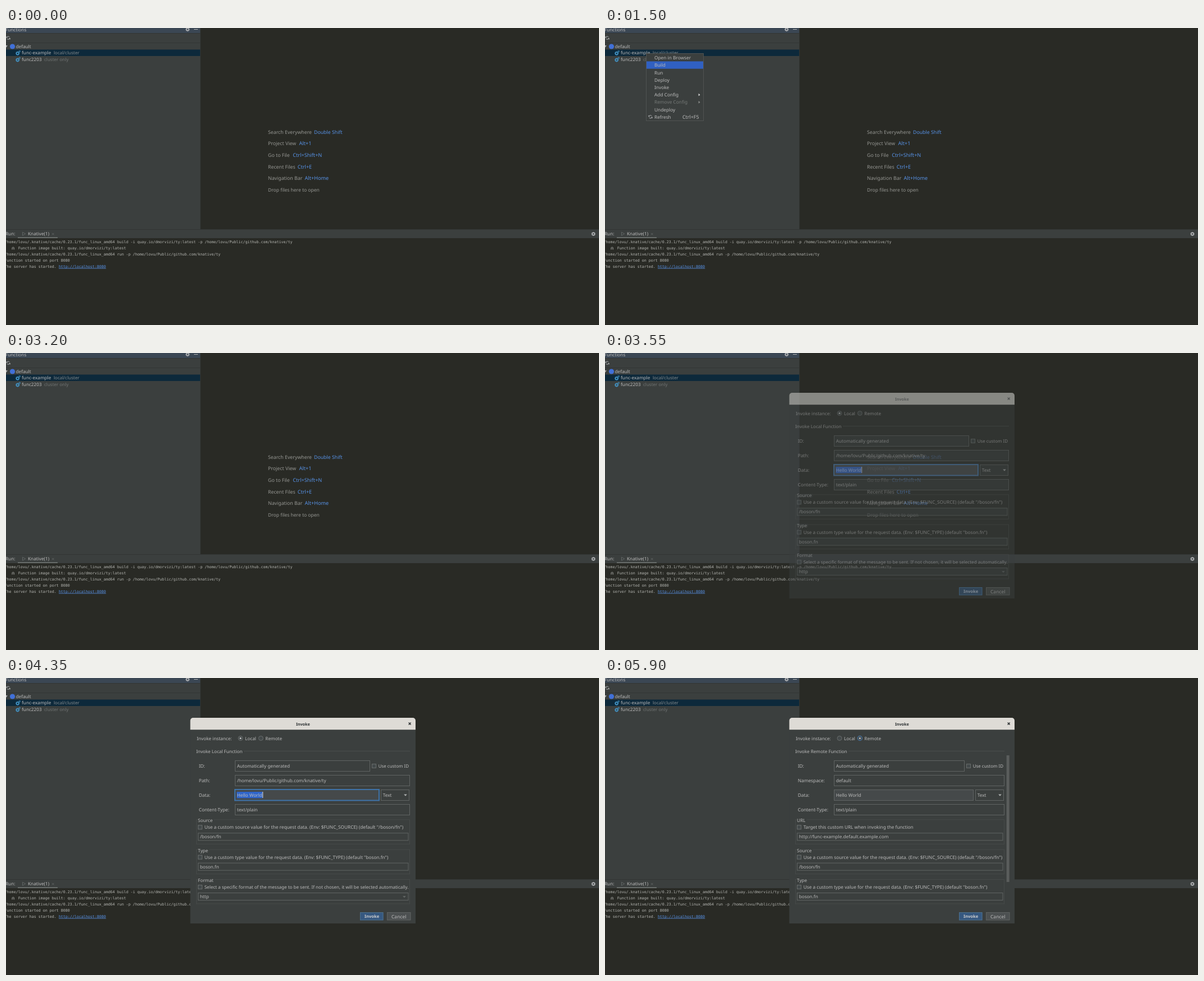
An HTML page with a canvas that plays this animation: 1057x530 px, repeating every 8 s.

```html
<!DOCTYPE html>
<html lang="en">
<head>
<meta charset="utf-8">
<title>Invoke function</title>
<style>
  html, body { margin: 0; width: 100%; height: 100%; overflow: hidden; background: #292a25; }
  canvas { display: block; }
</style>
</head>
<body>
<canvas id="stage" width="1057" height="530"></canvas>
<script>
const ctx = document.getElementById('stage').getContext('2d');
const LOOP = 8000;
const PANEL = '#3b3f3e', EDITOR = '#292a25', TEXT = '#bbbbbb', LINE = '#323534';
const SANS = '"Noto Sans", sans-serif', MONO = '"DejaVu Sans Mono", monospace';
const HOME = '/home/lovu';
const PROJECT = HOME + '/Public/github.com/knative/ty';
const CLI = HOME + '/.knative/cache/0.23.1/func_linux_amd64';

function rect(x, y, w, h, fill, border, weight = 1) {
  ctx.fillStyle = fill;
  ctx.fillRect(x, y, w, h);
  if (border) {
    ctx.strokeStyle = border;
    ctx.lineWidth = weight;
    ctx.strokeRect(x + weight / 2, y + weight / 2, w - weight, h - weight);
  }
}

// y is the middle of the capitals
function text(str, x, y, color = TEXT, size = 8.2, weight = 400, family = SANS) {
  ctx.font = `${weight} ${size}px ${family}`;
  ctx.fillStyle = color;
  ctx.fillText(str, x, y + size * 0.36);
}

function path(points, color, weight, close) {
  ctx.beginPath();
  points.forEach(([x, y]) => ctx.lineTo(x, y));
  if (close) ctx.closePath();
  if (weight) {
    ctx.strokeStyle = color;
    ctx.lineWidth = weight;
    ctx.stroke();
  } else {
    ctx.fillStyle = color;
    ctx.fill();
  }
}

function circle(x, y, r, fill, border, weight = 1) {
  ctx.beginPath();
  ctx.arc(x, y, r, 0, 7);
  if (fill) { ctx.fillStyle = fill; ctx.fill(); }
  if (border) { ctx.strokeStyle = border; ctx.lineWidth = weight; ctx.stroke(); }
}

function cross(x, y, r, color, weight) {
  path([[x - r, y - r], [x + r, y + r]], color, weight);
  path([[x - r, y + r], [x + r, y - r]], color, weight);
}

function gear(x, y, r, color) {
  for (let i = 0; i < 8; i++) {
    const a = i * Math.PI / 4, c = Math.cos(a), s = Math.sin(a);
    path([[x + c * r * 0.6, y + s * r * 0.6], [x + c * r, y + s * r]], color, r * 0.42);
  }
  circle(x, y, r * 0.58, null, color, r * 0.4);
}

function refreshIcon(x, y) {
  ctx.strokeStyle = '#afb1b3';
  ctx.lineWidth = 1;
  for (const start of [0.25, 3.39]) {
    ctx.beginPath();
    ctx.arc(x, y, 2.7, start, start + 2.4);
    ctx.stroke();
  }
  path([[x - 3.6, y - 3], [x - 3.6, y - 0.2], [x - 0.9, y - 0.2]], '#afb1b3');
  path([[x + 3.6, y + 3], [x + 3.6, y + 0.2], [x + 0.9, y + 0.2]], '#afb1b3');
}

function drawTree() {
  rect(0, 0, 346, 360, PANEL);
  rect(0, 0, 346, 9, '#3b4754');
  rect(0, 9, 346, 1, LINE);
  rect(0, 26, 346, 1, LINE);
  rect(346, 0, 1, 360, LINE);
  text('Functions', -1, 2.8);
  gear(323.7, 2.5, 3.6, '#afb1b3');
  rect(335, 2, 7, 1, '#afb1b3');
  refreshIcon(4, 17.7);

  rect(0, 38.5, 346, 11.5, '#0d293b');
  path([[-2, 31], [2.8, 31], [0.4, 35]], '#adadad');
  circle(11.5, 33, 4.6, '#4170d8');
  text('default', 17.5, 33.2);
  [['func-example', 44.5, 'local/cluster', 85, '#858b8e'],
   ['func2203', 56.2, 'cluster only', 68, '#707473']].forEach(([name, y, note, x, color]) => {
    gear(20.7, y + 0.8, 3.6, '#4293c4');
    gear(24.3, y - 2.7, 1.8, '#4293c4');
    text(name, 28, y);
    text(note, x, y, color, 8.03);
  });
}

function drawTips() {
  [['Search Everywhere', 'Double Shift', 549], ['Project View', 'Alt+1', 522.5],
   ['Go to File', 'Ctrl+Shift+N', 511.3], ['Recent Files', 'Ctrl+E', 519.7],
   ['Navigation Bar', 'Alt+Home', 532.5], ['Drop files here to open', '', 0]
  ].forEach(([label, keys, x], i) => {
    const y = 185.5 + i * 20.65;
    text(label, 467, y, '#969793', i === 5 ? 8.5 : 8.78);
    text(keys, x, y, '#5792e6', i ? 9.15 : 8.75);
  });
}

function drawConsole() {
  rect(0, 359, 1057, 1, LINE);
  rect(0, 360, 1057, 15, PANEL);
  text('Run:', -1, 367.5);
  path([[29.5, 364.3], [34.8, 367.3], [29.5, 370.3]], '#606564', 1, true);
  text('Knative(1)', 39, 367.5);
  cross(83.8, 367.6, 1.7, '#646867', 0.9);
  rect(21, 373.4, 71, 1.6, '#737876');
  gear(1047, 367.5, 3.6, '#afb1b3');

  const line = (str, row, x = -2.4, color = '#b6b7b3') =>
    text(str, x, 381.9 + row * 10.9, color, 6.66, 400, MONO);
  line(CLI + ' build -i quay.io/dmorvizi/ty:latest -p ' + PROJECT, 0);
  ctx.beginPath();
  ctx.arc(12.7, 393, 1.9, Math.PI, 0);
  ctx.lineTo(14.6, 395.5);
  ctx.moveTo(10.8, 393);
  ctx.lineTo(10.8, 395.5);
  ctx.moveTo(12.7, 392.5);
  ctx.lineTo(12.7, 395);
  ctx.strokeStyle = '#969793';
  ctx.lineWidth = 0.9;
  ctx.stroke();
  line('Function image built: quay.io/dmorvizi/ty:latest', 1, 21.7);
  line(CLI + ' run -p ' + PROJECT, 2);
  line('Function started on port 8080', 3);
  line('The server has started. ', 4);
  line('http://localhost:8080', 4, 93.9, '#5792e6');
  rect(94, 428.6, 84.3, 0.8, '#5792e6');
}

function drawTooltip() {
  rect(73, 56, 369, 19, '#4b4d4d', '#5f6262');
  text('Name: func-example, Namespace: default, URL: http://func-example.default.example.com', 78, 65.5);
}

function drawMenu(hovered) {
  rect(73, 45, 103, 121, PANEL, '#505352');
  ['Open in Browser', 'Build', 'Run', 'Deploy', 'Invoke', 'Add Config', 'Remove Config', 'Undeploy', 'Refresh']
    .forEach((label, i) => {
      const y = 53.2 + i * 13.2, color = i === 6 ? '#757977' : TEXT;
      if (i === hovered) rect(74, y - 6.9, 101, 13.2, '#3060c2');
      text(label, 88, y, color, 8.3);
      if (i === 5 || i === 6) path([[166.7, y - 2.4], [169.6, y], [166.7, y + 2.4]], i === 6 ? '#8a8d8b' : '#d5d5d5');
    });
  refreshIcon(81, 158.5);
  text('Ctrl+F5', 138, 158.8, TEXT, 8.9);
}

function field(x, y, right, h, value, fill = PANEL) {
  rect(x, y, right - x, h, fill, '#606463');
  text(value, x + 3.7, y + h / 2);
}

function checkbox(x, y, label, size) {
  rect(x, y - 4, 8, 8, '#43494a', '#686c6b');
  text(label, x + 11.7, y + 0.2, TEXT, size);
}

function dropArrow(x, y, color) {
  path([[x - 2.8, y - 1.4], [x + 2.8, y - 1.4], [x, y + 1.7]], color);
}

function radio(x, label, selected, focused) {
  circle(x, 107.5, 4, '#43494a', focused ? '#466d94' : '#696d6c', focused ? 1.5 : 1);
  if (selected) circle(x, 107.5, 1.5, '#c4c4c4');
  text(label, x + 8, 107.7);
}

function section(y, title, note, value, right, size) {
  ctx.strokeStyle = '#464a49';
  ctx.lineWidth = 1;
  ctx.strokeRect(339.5, y - 1.5, right - 340, 43.5);
  ctx.font = '8.2px ' + SANS;
  rect(341, y - 3, ctx.measureText(title).width + 3, 6, PANEL);
  text(title, 342, y + 0.2);
  checkbox(342, y + 12, note, size);
  field(342, y + 22, right - 2.5, 14, value);
}

function drawDialog({ remote, focusRemote, caret, alpha }) {
  ctx.globalAlpha = alpha;
  ctx.fillStyle = PANEL;
  ctx.beginPath();
  ctx.roundRect(328.5, 71, 401.5, 367, [5, 5, 0, 0]);
  ctx.fill();
  ctx.fillStyle = '#dedbd6';
  ctx.beginPath();
  ctx.roundRect(328.5, 71, 401.5, 21.3, [5, 5, 0, 0]);
  ctx.fill();
  text('Invoke', 517, 82, '#2c3032', 7.2, 700);
  cross(719.7, 81.6, 2, '#2c3032', 1.4);

  text('Invoke instance:', 340, 107.7);
  radio(418, 'Local', !remote, false);
  radio(454.3, 'Remote', remote, focusRemote);

  const right = remote ? 712 : 720;
  text(`Invoke ${remote ? 'Remote' : 'Local'} Function`, 339, 130.7, TEXT, 8.1);
  rect(remote ? 434 : 424, 130, right - (remote ? 434 : 424), 1, '#4a4e4d');
  ['ID:', remote ? 'Namespace:' : 'Path:', 'Data:', 'Content-Type:'].forEach((label, i) =>
    text(label, 343.7, 157.4 + i * 25.9, TEXT, 8.3));

  field(408, 147, right - 71, 20, 'Automatically generated');
  checkbox(right - 68, 157, 'Use custom ID', 7.95);
  field(408, 173, right, 20, remote ? 'default' : PROJECT);

  const dataRight = right - 55;
  field(408, 199, dataRight, 20, '', '#45494a');
  if (!focusRemote) {
    rect(407, 198, dataRight - 406, 21.5, '#45494a', '#3f73a8', 2);
    rect(411.3, 203, 46, 11.5, '#2f65ca');
  }
  text('Hello World', 411.7, 209);
  if (caret) rect(457.2, 203, 1, 11, '#dddddd');
  field(right - 52, 199, right - 1, 20, 'Text');
  dropArrow(right - 8, 209, '#b0b2b1');
  field(408, 225, right, 20, 'text/plain');

  const source = ['Source', 'Use a custom source value for the request data. (Env: $FUNC_SOURCE) (default "/boson/fn")', '/boson/fn'];
  const type = ['Type', 'Use a custom type value for the request data. (Env: $FUNC_TYPE) (default "boson.fn")', 'boson.fn'];
  if (remote) {
    section(254.3, 'URL', 'Target this custom URL when invoking the function', 'http://func-example.default.example.com', right);
    section(307.7, ...source, right, 8.27);
    section(361, ...type, right, 8.25);
    rect(715.7, 138, 5, 226, '#5a5d5c');
  } else {
    section(254.3, ...source, right, 8.27);
    section(307.7, ...type, right, 8.25);
    section(361, 'Format', 'Select a specific format of the message to be sent. If not chosen, it will be selected automatically.', 'http', right, 8.04);
    dropArrow(710, 390.5, '#626665');
  }

  rect(631, 418, 41.5, 14.3, '#365880', '#4c708c');
  text('Invoke', 639, 425.5, '#cccccc', 7.6, 700);
  rect(679, 418, 42.5, 14.3, '#4c5051', '#5e6261');
  text('Cancel', 687, 425.5, TEXT, 8.5);
  ctx.globalAlpha = 1;
}

// Menu row under the pointer, by the time it is reached
const HOVERS = [[950, -1], [1400, 0], [1500, 1], [1600, 2], [2050, 3], [2850, 4]];

function draw(t) {
  rect(0, 0, 1057, 530, EDITOR);
  drawTree();
  drawTips();
  drawConsole();
  if (t >= 300 && t < 950) drawTooltip();
  if (t >= 950 && t < 3200) drawMenu(HOVERS.findLast(([start]) => t >= start)[1]);
  if (t >= 3550) drawDialog({
    alpha: t < 3600 ? 0.5 : 1,
    focusRemote: t >= 5700,
    remote: t >= 5900,
    caret: t < 5700 && Math.floor((t - 3350) / 500) % 2 === 0
  });
}

function tick() {
  draw(performance.now() % LOOP);
  requestAnimationFrame(tick);
}

ctx.textRendering = 'geometricPrecision';
tick();
</script>
</body>
</html>
```
